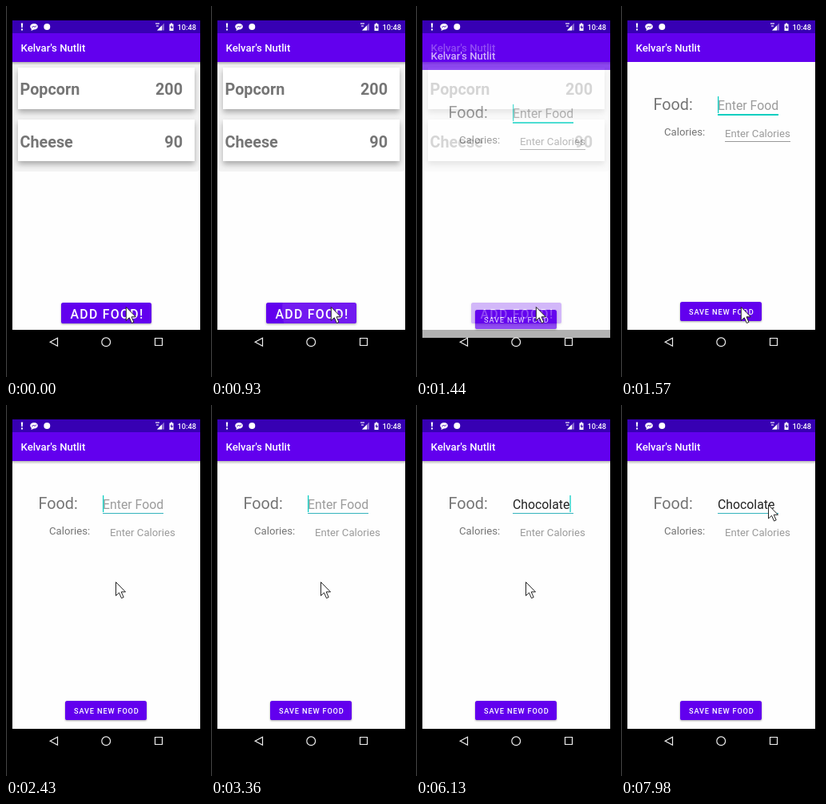
Animation, 249 px wide and 464 px high, one loop 8000 ms. Source, as an HTML page:

```html
<!DOCTYPE html>
<html lang="en">
<head>
<meta charset="utf-8">
<style>
  html, body { margin: 0; width: 100%; height: 100%; overflow: hidden; background: #000; }
  svg { display: block; }
  text { font: 15.84px Roboto, sans-serif; fill: #757575; white-space: pre; }
  .title { font-size: 13.2px; font-weight: 500; fill: #fff; }
  .clock { font-size: 9.24px; }
  .item { font-size: 19.8px; font-weight: 700; }
  .label { font-size: 19.8px; }
  .small { font-size: 13.2px; }
  .hint { fill: #9b9b9b; }
  .button { font-weight: 500; fill: #fff; letter-spacing: 1.3px; }
  .save { font-size: 9.24px; letter-spacing: .0893em; }
  .card { fill: #fff; filter: drop-shadow(0 4px 3.5px rgba(0,0,0,.3)); }
  .raised { fill: #6200ee; filter: drop-shadow(0 1px 1px rgba(0,0,0,.35)); }
  .raised.pressed { filter: drop-shadow(0 1.5px 1.5px rgba(0,0,0,.35)); }
</style>
</head>
<body>
<svg width="249" height="464" viewBox="0 0 249 464">
  <defs>
    <linearGradient id="shade" x2="0" y2="1">
      <stop stop-opacity=".28"/><stop offset="1" stop-opacity="0"/>
    </linearGradient>
    <clipPath id="buttonClip"><rect x="69" y="371" width="113" height="26" rx="2.6"/></clipPath>
    <clipPath id="screenClip"><path d="M8 34h235v381H8z"/></clipPath>
    <g id="page">
      <path fill="#fefefe" d="M8 34h235v371H8z"/>
      <path fill="#6200ee" d="M8 34h235v36H8z"/>
      <text class="title" x="18.5" y="57">Kelvar's Nutlit</text>
    </g>
    <path id="barShadow" fill="url(#shade)" d="M8 70h235v4H8z"/>
  </defs>

  <path d="M0 0h249v464H0z"/>
  <path fill="#444" d="M0 0h1v464H0z"/>
  <path fill="#3700b3" d="M8 18h235v16H8z"/>

  <g id="list">
    <use href="#page"/>
    <path fill="#f3f3f3" d="M8 70h235v131q0 6-6 6H14q-6 0-6-6z"/>
    <use href="#barShadow"/>
    <path class="card" d="M15 77h221v52H15z"/>
    <path class="card" d="M15 142h221v52H15z"/>
    <text class="item" x="17.5" y="111">Popcorn</text>
    <text class="item" x="221" y="111" text-anchor="end">200</text>
    <text class="item" x="17.5" y="177">Cheese</text>
    <text class="item" x="221" y="177" text-anchor="end">90</text>
    <rect id="add" class="raised" x="69" y="371" width="113" height="26" rx="2.6"/>
    <circle id="ripple" cx="154" cy="380" fill="#fff" clip-path="url(#buttonClip)"/>
    <text class="button" x="80.5" y="390.5">ADD FOOD!</text>
  </g>

  <g clip-path="url(#screenClip)">
    <g id="form">
      <use href="#page"/>
      <use id="formShadow" href="#barShadow"/>
      <text class="label" x="40.5" y="130">Food:</text>
      <text class="small" x="54" y="162">Calories:</text>
      <text id="food" x="121" y="130"></text>
      <text class="small hint" x="130" y="164">Enter Calories</text>
      <path d="M121 135h76v1h-76z" fill="#35b3bd"/>
      <g id="settling">
        <path d="M121 135h76v2h-76z" fill="#03cfc0"/>
        <path d="M130 169h82v1h-82z" fill="#999"/>
      </g>
      <rect id="caret" y="113" width="1.3" height="21" fill="#0fcfc4"/>
      <rect class="raised" x="74" y="370" width="102" height="24" rx="2.6"/>
      <text class="button save" x="85" y="385.5">SAVE NEW FOOD</text>
    </g>
  </g>

  <g fill="#fff">
    <path d="M18.8 21.5h2.4l-.5 5.8h-1.4zM19 28.6h2v2h-2z"/>
    <path d="M35 22c6.5 0 6.5 7.5 0 7.5l-3.5 1.5.4-2.3c-3.2-2.5-1.5-6.7 3.1-6.7z"/>
    <path d="M32.5 27l2-2 1.5 1.5 2-2" fill="none" stroke="#3700b3"/>
    <circle cx="51.3" cy="26" r="4"/>
    <path d="M198 21.5v9h-9z" opacity=".4"/>
    <path d="M195 24.5v6h-6z"/>
    <path d="M187 22h5M188 25h3" stroke="#fff" stroke-width="1.3" opacity=".75"/>
    <path d="M206 21.5h2v1h1.5v8.5h-5v-8.5H206z"/>
    <path d="M207.5 23.5l-2 3.5h1.5v2.5l2-3.5h-1.5z" fill="#3700b3"/>
    <text class="title clock" x="214.5" y="29.5">10:48</text>
  </g>
  <g fill="none" stroke="#eee" stroke-width="1.2">
    <path d="M64.5 415.3v10l-9.3-5z"/>
    <circle cx="125.2" cy="420.3" r="5.4"/>
    <path d="M186.5 415.5h9v9h-9z"/>
  </g>
  <path id="pointer" d="M0 0V17l4-3.7 3 6.8 2.7-1.2-3-6.6h5.3z" fill="#fff" stroke="#222"/>
</svg>
<script>
const $ = id => document.getElementById(id);
const show = (id, on) => $(id).style.display = on ? '' : 'none';
const set = (id, attrs) => { for (const k in attrs) $(id).setAttribute(k, attrs[k]); };

const LOOP = 8000, WORD = 'Chocolate';
const PRESS = 780, ENTER = 1440, OPEN = 1570, SETTLED = 1720;
const keyTimes = [4170, 4440, 4810, 4970, 5120, 5400, 5550, 5860, 6130];
const blinkTimes = [1870, 2430, 2960, 3360, 3920, 4170, 6660, 7220, 7680];
const pointerStops = [[0, 150.3, 376.5], [SETTLED, 146.5, 344], [1870, 137.5, 221.5], [7980, 184.5, 125]];
const rippleStops = [[0, 0, 0], [PRESS, 30, .1], [930, 65, .1], [1050, 100, .08], [1170, 110, .06]];

const passed = (times, t) => times.filter(x => x <= t).length;
const current = (stops, t) => stops[passed(stops.map(s => s[0]), t) - 1];

function draw(t) {
  const [, radius, alpha] = current(rippleStops, t);
  set('ripple', { r: radius, opacity: alpha });
  $('add').classList.toggle('pressed', t >= PRESS);

  const entering = t < OPEN;
  show('list', entering);
  show('form', t >= ENTER);
  set('form', { transform: `translate(0 ${entering ? 10 : 0})`, opacity: entering ? .7 : 1 });
  show('settling', t < SETTLED);
  show('formShadow', t >= SETTLED);

  const typed = WORD.slice(0, passed(keyTimes, t));
  const food = $('food');
  food.textContent = typed || 'Enter Food';
  food.style.fill = typed ? '#222' : '#9b9b9b';
  set('caret', { x: 121 + (typed ? food.getComputedTextLength() : 0) });
  show('caret', passed(blinkTimes, t) % 2 === 0);

  const [, x, y] = current(pointerStops, t);
  set('pointer', { transform: `translate(${x} ${y})` });
}

function tick() {
  draw(performance.now() % LOOP);
  requestAnimationFrame(tick);
}
tick();
</script>
</body>
</html>
```
